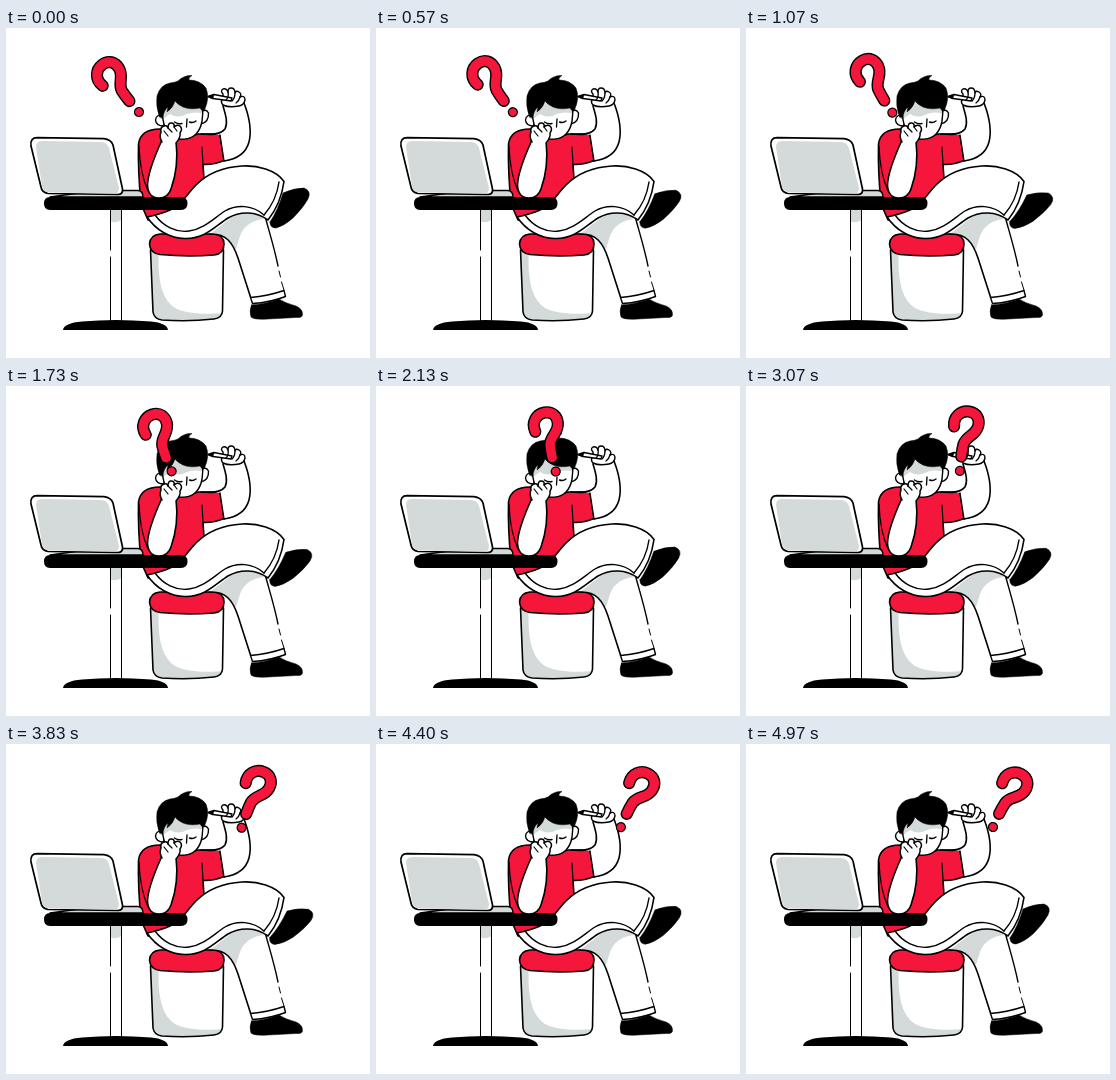
An HTML page with a canvas that plays this animation: 364 px wide and 330 px high, repeating every 5000 ms.

```html
<!DOCTYPE html>
<html lang="en">
<head>
<meta charset="utf-8">
<title>Thinking at the desk</title>
<style>
html, body { margin: 0; width: 100%; height: 100%; overflow: hidden; background: #fff; }
canvas { display: block; width: 364px; height: 330px; }
</style>
</head>
<body>
<canvas id="stage"></canvas>
<script>
const W = 364, H = 330, LOOP = 5000;
const INK = '#000', RED = '#f5163b', GRAY = '#d4dad9', WHITE = '#fff';
const DEG = Math.PI / 180;
const canvas = document.getElementById('stage');
const ctx = canvas.getContext('2d');
const dpr = window.devicePixelRatio || 1;
canvas.width = W * dpr;
canvas.height = H * dpr;

// Smooth 0 to 1 over p = 0..1.
const ease = p => (1 - Math.cos(Math.PI * p)) / 2;

function shape(d, fill, line = 1.6) {
  const p = new Path2D(d);
  if (fill) { ctx.fillStyle = fill; ctx.fill(p); }
  if (line) { ctx.strokeStyle = INK; ctx.lineWidth = line; ctx.stroke(p); }
}

const line = (d, w = 1.6) => shape(d, null, w);

// Fills a shade that stays inside an outlined body.
function shaded(body, shade, fill, w = 1.6) {
  shape(body, fill, 0);
  ctx.save();
  ctx.clip(new Path2D(body));
  shape(shade, GRAY, 0);
  ctx.restore();
  if (w) line(body, w);
}

function drawStool() {
  shaded('M144.500 222 L147 284 Q148 291 156 292 Q182 294 208 291 Q216 290 216.500 283 L217.500 222 Z',
    'M144 220 H153 C151 250 155 271 169 280 C182 287 204 286 218 285 V296 H144 Z', WHITE);
  shape('M154 206 H208 Q218 207 218 216 Q218 226 208 227 Q180 229 154 226.500 Q144 225 143.500 216 Q144 207 154 206 Z', RED);
}

function drawBackLeg() {
  shaded('M204 206 C220 205 227 215 232 230 L244.500 269 L246.500 275.500 L279.500 268.500 L278 262 C274 240 267 212 259 186 L240 178 Z',
    'M200 208 L222 186 L264 182 V191 C248 190 238 197 234 208 L230 221 Z', WHITE, 0);
  line('M204 206 C220 205 227 215 232 230 L244.500 269');
  line('M259 188 C262 200 268 218 272 238', 1.4);
  line('M273 243 L274.500 249 M275.500 254 L278 262', 1);
  line('M244.500 269.500 Q262 268 278 262.500 L279.500 268.500 Q264 274.500 246.500 275.500 Z', 1.4);
  shape('M245.500 277 Q260 276 273 271 Q279 275 290 278 Q297 281 296.500 287 Q296 290 290 289.500 L262 291 Q248 292 245 289 Q243 283 245.500 277 Z', INK, 0.5);
}

function drawTorso() {
  shape('M154 101 C143 101 134 105 132.500 116 C132 135 133 155 135 176 L142 192 L165 194 L190 172 L198 151 L197 136.500 Q208 137 218 132.500 L214 106 L192 106 L176 111 Z', RED);
  line('M197 136 L196 119', 1.2);
  line('M133 118 Q134 145 142 163', 1.2);
}

function drawRaisedArm() {
  shape('M217 78 C220 88 222 95 219 101 C214 107 205 107 197 106 L214 107 L218 133 C232 131 240 125 243 114 C246 102 243 88 238 75 L228 70 Z', WHITE, 0);
  line('M217 78 C220 88 222 95 219 101 C214 107 205 107 195 106');
  line('M218 133 C232 131 240 125 243 114 C246 102 243 88 238 75');
  line('M214 107 L218 133', 1.4);
}

function drawPencilHand() {
  shape('M217 66 Q214 63 217 61 Q221 60 222 64 Q222 60 225 60 Q229 60 229 65 Q230 62 233 64 Q236 66 234 69 Q239 67 239 72 Q238 77 233 78 Q223 80 217 77 Q214 74 217 70 Z', WHITE, 1.4);
  shape('M202 68.500 L208 66.500 L226 70 L225 73 L207 70.500 Z', WHITE, 1.4);
  shape('M202 68.500 L208 66.500 L207 70.500 Z', INK, 0.5);
  line('M222 64 Q223 69 220 72 M229 65 Q229 70 226 73 M234 69 Q233 73 230 75', 1.3);
}

function drawHead() {
  shape('M195 84 Q200 80 202.500 85 Q203 94 195 96 Z', WHITE, 1.4);
  shape('M158 87 Q150 86 149.500 92 Q150 98 158 98 Z', WHITE, 1.4);
  shaded('M157 78 C155 92 159 103 166 108 C173 113 184 112 190 106 C196 100 198 88 196 76 L178 66 Z',
    'M156 70 H198 V86 Q188 83 181 86 Q172 91 164 86 L157 91 Z', WHITE, 1.4);
  shape('M153.500 89 Q149.500 78 151 68 Q154 57 164 55 Q169 54.500 172 53 Q178 47 186 47.500 Q182 50 183 52 Q194 52 200 60 Q204 70 198.500 82 Q196 84 194 80 Q184 82 177 79 Q171 76 169 73 Q167 80 161 84 L162 79 Q158 82 156.500 90 Z', INK, 0.5);
  line('M168.500 94 Q172 96.500 176 95.500 M183.500 94 Q187 95.500 190 93', 1.4);
  line('M181 91 L180.500 99', 1.3);
}

function drawLeaningArm() {
  const hand = 'M156 114 Q153 109 155 104 Q154 99 158 98 Q161 97 162 100 Q162 95 165 95 Q169 95 168 99 Q171 96 174 98 Q177 101 174 105 Q175 109 170 115';
  shape('M156 112 C151 123 142 143 141.500 157 Q142 170 153 170 Q162 170 165 161 C170 147 172 130 170 113 L164 106 Z', WHITE);
  shape(hand + ' Q165 119 158 117 Z', WHITE, 0);
  line(hand, 1.5);
  line('M162 100 L166 104 M168 99 L171 103 M158 103 L162 108', 1.2);
}

function drawSwingingFoot(t) {
  const dip = (1 - Math.cos(4 * Math.PI * t / LOOP)) / 2;
  ctx.save();
  ctx.translate(266, 192);
  ctx.rotate(9 * dip * DEG);
  ctx.translate(-266, -192);
  shape('M264 194 Q272 182 277 165 Q288 160 298 160 Q306 163 302 171 Q297 180 287 190 Q278 198 270 200 Q264 200 264 194 Z', INK, 0.5);
  ctx.restore();
}

function drawFrontLeg() {
  shape('M141 189 Q155 186 164 182 C175 178 181 166 190 157 C203 144 218 139 236 138 C251 137 270 142 278 153.500 C276 168 270 182 262 192 C250 183 234 183 222 190 C208 199 200 210 180 210.500 C164 211 150 202 141 189 Z', WHITE);
  line('M149 187 C157 198 170 205 183 203 C198 201 208 190 219 183 C231 176 247 177 258 187', 1.4);
  line('M273 154 C271 168 265 179 258 187', 1.4);
}

function drawDesk() {
  shape('M104 180 H115.500 V294 H104 Z', WHITE, 0);
  shape('M104 180 H115.500 V192 Q109 196 104 193 Z', GRAY, 0);
  line('M115.500 181 V293 M104.500 181 V222 M104.500 229 V293', 1);
  shape('M57 302 Q58 295 76 293.500 Q109 290.500 145 293.500 Q161 295 162 302 Z', INK, 0);
  shape('M44 169 H175 Q181.500 169 181.500 175.500 Q181.500 182 175 182 H44 Q38 182 38 175.500 Q38 169 44 169 Z', INK, 0);
}

function drawLaptop() {
  shape('M92 162.500 H132 Q137 163 137 169 H44 Z', GRAY, 1.4);
  shape('M31 109.700 L98 110.700 Q105 111.500 107 117 L116.500 161 Q117 166.500 112 166.500 L42 165.500 Q36 164.500 35 159 L25 118 Q24 109.700 31 109.700 Z', WHITE, 1.7);
  shape('M36 113 L95 114 Q101 114 103 120 L113 160 Q113 165 109 165.500 L42 164.500 Q37 163 36 158 L30 119 Q30 113 36 113 Z', GRAY, 0);
}

const hook = new Path2D('M-12.500 -43 C-15 -53 -8 -60 0 -60 C8 -60 12 -54 11.200 -47 C10 -37 1 -36 -0.500 -27 Q-1 -22 -0.800 -14.500');

function drawMark(t) {
  const e = ease(Math.min(1, t / LOOP * 1.038));
  ctx.save();
  ctx.translate(133 + 114 * e, 84 - e + 2 * Math.sin(Math.PI * e));
  ctx.rotate((-38 + 66 * e) * DEG);
  for (const [color, width, r] of [[INK, 12.2, 5.1], [RED, 9.4, 3.8]]) {
    ctx.strokeStyle = ctx.fillStyle = color;
    ctx.lineWidth = width;
    ctx.stroke(hook);
    ctx.beginPath();
    ctx.arc(0, 0, r, 0, 2 * Math.PI);
    ctx.fill();
  }
  ctx.restore();
}

function draw(t) {
  ctx.setTransform(dpr, 0, 0, dpr, 0, 0);
  ctx.fillStyle = WHITE;
  ctx.fillRect(0, 0, W, H);
  ctx.lineCap = ctx.lineJoin = 'round';
  drawStool();
  drawBackLeg();
  drawTorso();
  drawRaisedArm();
  drawPencilHand();
  drawHead();
  drawSwingingFoot(t);
  drawFrontLeg();
  drawDesk();
  drawLeaningArm();
  drawLaptop();
  drawMark(t);
}

const start = performance.now();
function tick() {
  draw((performance.now() - start) % LOOP);
  requestAnimationFrame(tick);
}
tick();
</script>
</body>
</html>
```
